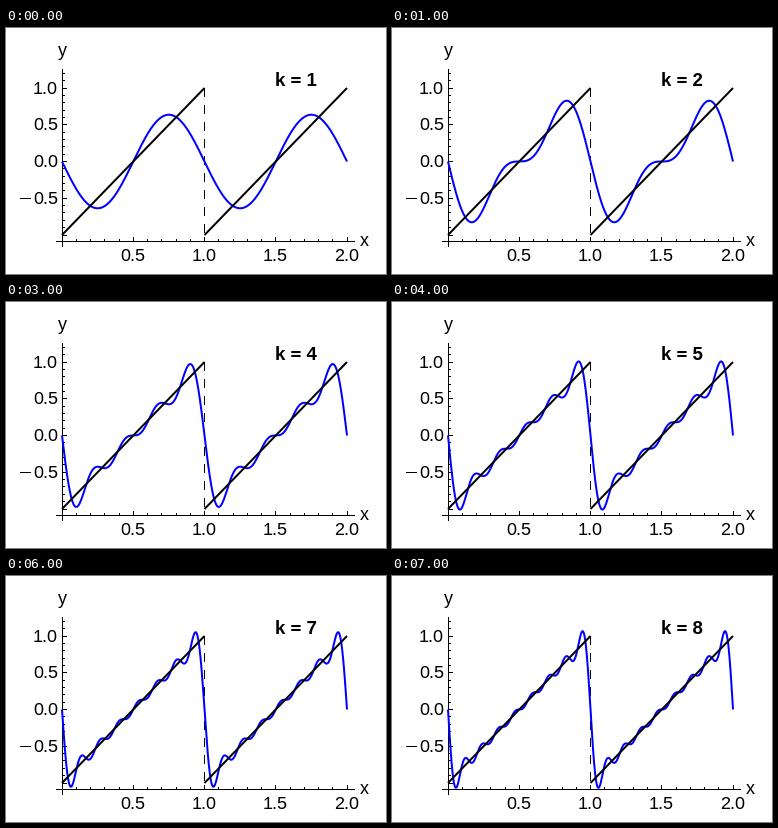
These frames come from a looping animation (380 by 246 pixels, 8 s). A matplotlib script:

```python
import numpy as np
import matplotlib.pyplot as plt
from matplotlib.animation import FuncAnimation

W, H, DPI = 380, 246, 100
X0, Y0 = 56.0, 133.5          # pixel position of the data origin
SX, SY = 142.5, 73.5          # pixels per data unit
AXIS_Y = 213.5
TERMS = 8

plt.rcParams["font.family"] = "Liberation Sans"
plt.rcParams["text.hinting"] = "native"
fig = plt.figure(figsize=(W / DPI, H / DPI), dpi=DPI, facecolor="white")
ax = fig.add_axes([0, 0, 1, 1])
ax.set_xlim(0, W)
ax.set_ylim(H, 0)
ax.axis("off")


def px(x):
    return X0 + SX * x


def py(y):
    return Y0 - SY * y


def line(xs, ys, color="black", width=2.0, **kw):
    return ax.plot(xs, ys, color=color, lw=width * 72 / DPI,
                   solid_capstyle="butt", **kw)[0]


def hairline(xs, ys, **kw):
    """One-pixel line centred on the pixel that holds its coordinates."""
    return line(np.floor(xs) + 0.5, np.floor(ys) + 0.5, width=1,
                antialiased=False, snap=False, **kw)


def label(x, y, text, size=18, ha="center", **kw):
    return ax.text(x, y, text, fontsize=size * 72 / DPI, ha=ha,
                   va="baseline", color="black", **kw)


def draw_axes():
    hairline([50, 348], [AXIS_Y] * 2)
    hairline([X0] * 2, [41, 218])
    for i in range(21):
        size = 4 if i % 5 == 0 else 2
        hairline([px(i / 10)] * 2, [AXIS_Y, AXIS_Y - size])
    for i in range(-10, 13):
        size = 4 if i % 5 == 0 else 2
        hairline([X0, X0 + size], [py(i / 10)] * 2)
    for v in (0.5, 1.0, 1.5, 2.0):
        label(px(v) - 0.5, 233, f"{v:.1f}")
    for v in (1.0, 0.5, 0.0, -0.5):
        label(52, py(v) + 5.5, f"{abs(v):.1f}", ha="right")
    hairline([14, 24], [py(-0.5)] * 2)
    label(358, 218, "x")
    label(56, 28, "y")


def partial_sum(x, k):
    n = np.arange(1, k + 1)[:, None]
    return -2 / np.pi * (np.sin(2 * np.pi * n * x) / n).sum(axis=0)


draw_axes()
hairline([px(1)] * 2, [py(1), py(-1)],
         linestyle=(0, (9, 9)), dash_capstyle="butt")
xs = np.linspace(0, 2, 801)
wave = line(px(xs), py(0 * xs), "#0000ff")
for start in (0, 1):
    line([px(start), px(start + 1)], [py(-1), py(1)])
title = label(269, 58, "", size=18.67, ha="left", weight="bold")


def update(i):
    k = i + 1
    wave.set_ydata(py(partial_sum(xs, k)))
    title.set_text(f"k = {k}")
    return wave, title


anim = FuncAnimation(fig, update, frames=TERMS, interval=1000,
                     repeat=True, repeat_delay=0)
plt.show()
```
